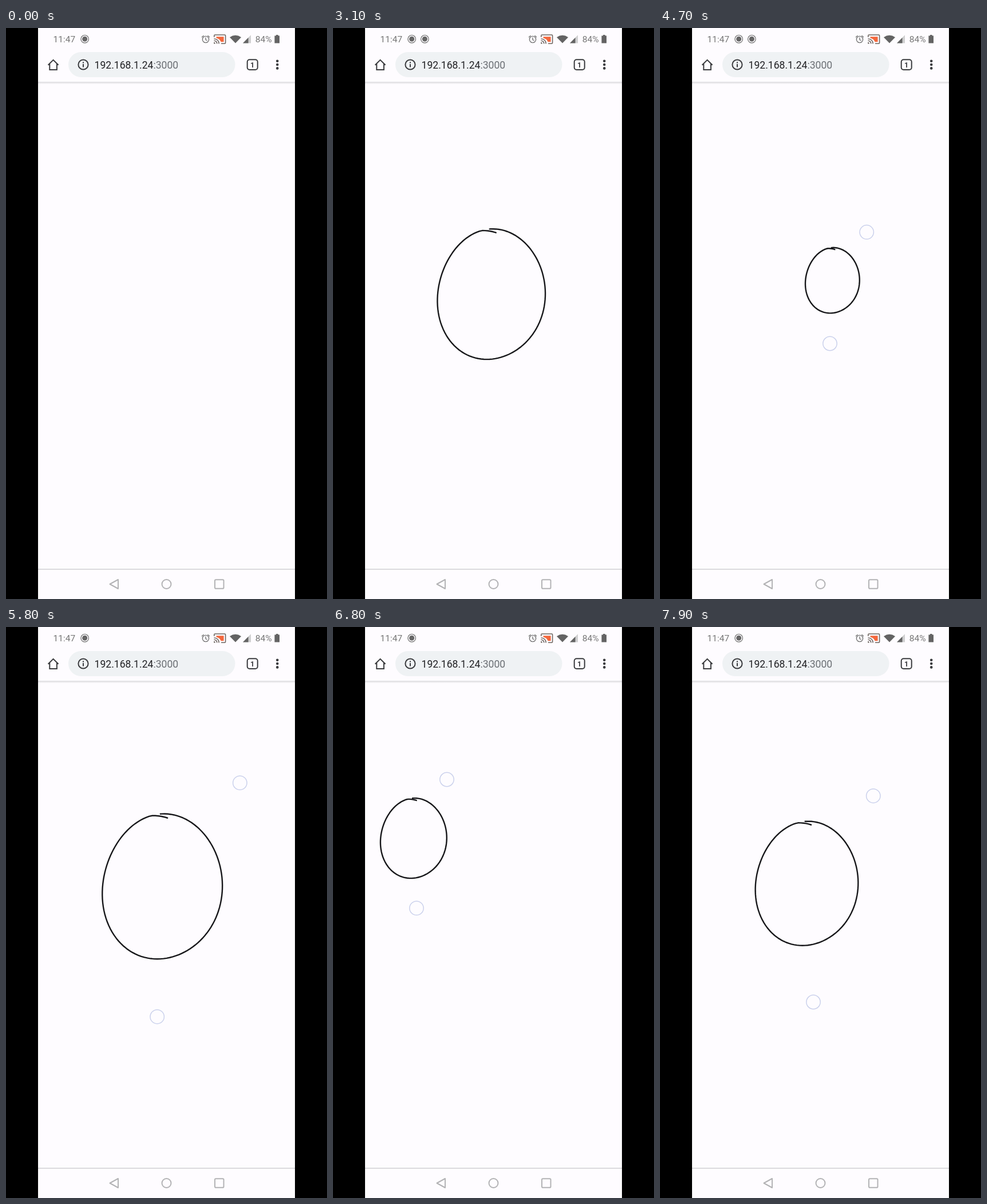
Animation of 561 by 998 pixels, one loop 8000 ms. Source, as an HTML page:

```html
<!DOCTYPE html>
<html lang="en">
<head>
<meta charset="utf-8">
<title>Drawing and pinch zoom</title>
<style>
  html, body { margin: 0; width: 100%; height: 100%; overflow: hidden; background: #000; }
  svg { display: block; width: 100%; height: 100%; }
  text { font-family: Roboto, Arial, sans-serif; }
  .status { font-size: 15.5px; fill: #757575; }
  .url { font-size: 17.6px; fill: #212124; }
  .url tspan { fill: #6b6f74; }
  .icon { fill: none; stroke: #3a3b3e; stroke-width: 2; }
  .nav { fill: none; stroke: #b3b3b5; stroke-width: 2; stroke-linejoin: round; }
  .touch { fill: rgba(253, 252, 255, .6); stroke: #cbd1ec; stroke-width: 1.5; }
  #ink { fill: none; stroke: #17171a; stroke-linecap: round; stroke-linejoin: round; }
</style>
</head>
<body>
<svg viewBox="0 0 561 998">
  <defs>
    <linearGradient id="shade" x2="0" y2="1">
      <stop offset="0" stop-color="#dadadd"/>
      <stop offset="1" stop-color="#fefcff"/>
    </linearGradient>
    <g id="rec">
      <circle r="6.8" fill="none" stroke="#6c6c6c" stroke-width="1.2"/>
      <circle r="4.5" fill="#666"/>
    </g>
  </defs>
  <rect width="561" height="998"/>
  <rect x="56" width="449" height="998" fill="#fefcff"/>

  <!-- status bar -->
  <text class="status" x="82.5" y="24.5">11:47</text>
  <use href="#rec" x="137.7" y="19.3"/>
  <use href="#rec" x="160.4" y="19.3" id="second"/>
  <g fill="none" stroke="#757575" stroke-width="1.4">
    <circle cx="349" cy="20" r="5.6"/>
    <path d="M349 16.5V20.5L351.6 22M342 16.2L345.6 13.2M356 16.2L352.4 13.2"/>
  </g>
  <path d="M367.5 15.2H380.6V24.2H375.6Q373.5 19 367.5 17.6Z" fill="#f4673c"/>
  <g fill="none" stroke="#6d6560" stroke-width="1.6">
    <path d="M363.8 16V13.4Q363.8 12 365.2 12H382.2Q383.6 12 383.6 13.4V25.8Q383.6 27.2 382.2 27.2H376"/>
    <path d="M363.5 19A8.2 8.2 0 0 1 372.2 27.4M363.5 22.3A5 5 0 0 1 368.8 27.4"/>
  </g>
  <path d="M363.2 24.8A2.6 2.6 0 0 1 365.8 27.4H363.2Z" fill="#6d6560"/>
  <path d="M391 16.2Q401 9.4 411 16.2L401 26.6Z" fill="#636363"/>
  <path d="M428 12.3V26.4H414Z" fill="#cfcfd0"/>
  <path d="M423.5 16.8V26.4H414Z" fill="#636363"/>
  <text class="status" x="435.8" y="24.5">84%</text>
  <path d="M472 12H475.6V13.4H478V26.6H469.4V13.4H472Z" fill="#636363"/>

  <!-- browser bar -->
  <rect x="56" y="94" width="449" height="4.5" fill="url(#shade)"/>
  <rect x="109" y="42" width="291.5" height="44" rx="22" fill="#eff2f4"/>
  <path class="icon" d="M73.6 64.8L82.6 55.8L91.6 64.8M76.3 62.5V73H88.9V62.5"/>
  <circle class="icon" cx="135" cy="64" r="8.6"/>
  <path class="icon" d="M135 63V68.5M135 59.3V61.4"/>
  <text class="url" x="154.5" y="70.7">192.168.1.24<tspan>:3000</tspan></text>
  <rect class="icon" x="421.7" y="55.2" width="18" height="17.8" rx="4"/>
  <text x="430.6" y="68.5" font-size="12.5" font-weight="700" fill="#3a3b3e" text-anchor="middle">1</text>
  <g fill="#3a3b3e">
    <circle cx="474.2" cy="57.7" r="2.3"/>
    <circle cx="474.2" cy="64" r="2.3"/>
    <circle cx="474.2" cy="70.4" r="2.3"/>
  </g>

  <!-- navigation bar -->
  <rect x="56" y="945.2" width="449" height="1.6" fill="#d3d3d5"/>
  <path class="nav" d="M181.5 972L196 964V980Z"/>
  <circle class="nav" cx="280.5" cy="972" r="8"/>
  <rect class="nav" x="365" y="964.3" width="15.5" height="15.4" rx="1.8"/>

  <path id="ink" pathLength="1"/>
  <circle class="touch" id="a" r="12.2"/>
  <circle class="touch" id="b" r="12.2"/>
</svg>

<script>
const LOOP = 8000, STEP = 100;
const SWEEP = 367;              // degrees covered by the hand-drawn loop
const PINCH_START = 3500;

// time, shape x, y, scale, upper finger x, y, lower finger x, y
const pinch = [
  [PINCH_START, 277, 465, .8985, 404, 303, 262, 663],
  [3900, 287, 448, .665, 380.7, 330.7, 276.4, 594.3],
  [4700, 301.5, 441, .4515, 361.2, 356.8, 297, 551.5],
  [5400, 273.5, 453.2, 1, 408.8, 272.4, 264.2, 681.2],
  [5800, 273.5, 453.2, 1, 408.8, 272.4, 264.2, 681.2],
  [6800, 141, 369, .552, 199, 266.5, 146, 491.4],
  [7900, 256.7, 448, .856, 372.8, 295.2, 268, 655.5]
];

const $ = id => document.getElementById(id);
const ink = $("ink"), fingerA = $("a"), fingerB = $("b"), second = $("second");
const clamp = v => Math.max(0, Math.min(1, v));
const show = (el, on) => el.setAttribute("visibility", on ? "visible" : "hidden");

// An uneven ellipse around the origin, drawn counterclockwise from the top
function strokePoint(deg) {
  const a = (-85 - deg) * Math.PI / 180;
  const wobble = -.027 * Math.sin(2 * a)
    - .0065 * (Math.cos(a) - Math.cos(3 * a))
    + .012 * (Math.sin(a) + Math.sin(3 * a));
  const hook = .055 * clamp(1 - deg / 16);
  const r = .997 + wobble - hook;
  return [105 * r * Math.cos(a), 127 * r * Math.sin(a)];
}

// Monotone cubic interpolation: flows through keys without overshoot
function sample(keys, t, k) {
  const slope = i => (keys[i + 1][k] - keys[i][k]) / (keys[i + 1][0] - keys[i][0]);
  const tangent = i => {
    if (i === 0 || i === keys.length - 1) return 0;
    const m = slope(i - 1), n = slope(i);
    return m * n > 0 ? 2 * m * n / (m + n) : 0;
  };
  let i = 0;
  while (i < keys.length - 2 && t >= keys[i + 1][0]) i++;
  const h = keys[i + 1][0] - keys[i][0], u = clamp((t - keys[i][0]) / h), w = 1 - u;
  return keys[i][k] * (1 + 2 * u) * w * w + keys[i + 1][k] * u * u * (3 - 2 * u)
    + h * (tangent(i) * u * w * w - tangent(i + 1) * u * u * w);
}

// Steady drawing that slows down over the last stretch
function progress(t) {
  if (t <= 2100) return .71 * clamp((t - 1350) / 750);
  const rest = 1 - clamp((t - 2100) / 600);
  return 1 - .29 * rest * rest;
}

function place(el, x, y) {
  el.setAttribute("cx", x);
  el.setAttribute("cy", y);
}

const points = Array.from({ length: SWEEP / 3 + 1 }, (_, i) => strokePoint(i * 3));
points.push(strokePoint(SWEEP));
ink.setAttribute("d", "M" + points.join("L"));
const total = ink.getTotalLength();

function render(t) {
  const zoom = t >= PINCH_START, drawing = t >= 1300 && t < 2900;
  const [x, y, s, ax, ay, bx, by] = [1, 2, 3, 4, 5, 6, 7].map(k => sample(pinch, t, k));
  const done = progress(t);

  ink.setAttribute("transform", `translate(${x} ${y}) scale(${s})`);
  ink.setAttribute("stroke-width", 2.4 / s);
  ink.setAttribute("stroke-dasharray", done < 1 ? `${done} 2` : "none");
  show(ink, done > 0);

  if (zoom) {
    place(fingerA, ax, ay);
    place(fingerB, bx, by);
  } else {
    const p = ink.getPointAtLength(total * progress(t - STEP));
    place(fingerA, x + p.x * s, y + p.y * s);
  }
  show(fingerA, zoom || drawing);
  show(fingerB, zoom);
  show(second, t >= 1000 && t < 5300);
}

const start = performance.now();
function tick() {
  const t = (performance.now() - start) % LOOP;
  render(Math.floor(t / STEP) * STEP);
  requestAnimationFrame(tick);
}
tick();
</script>
</body>
</html>
```
